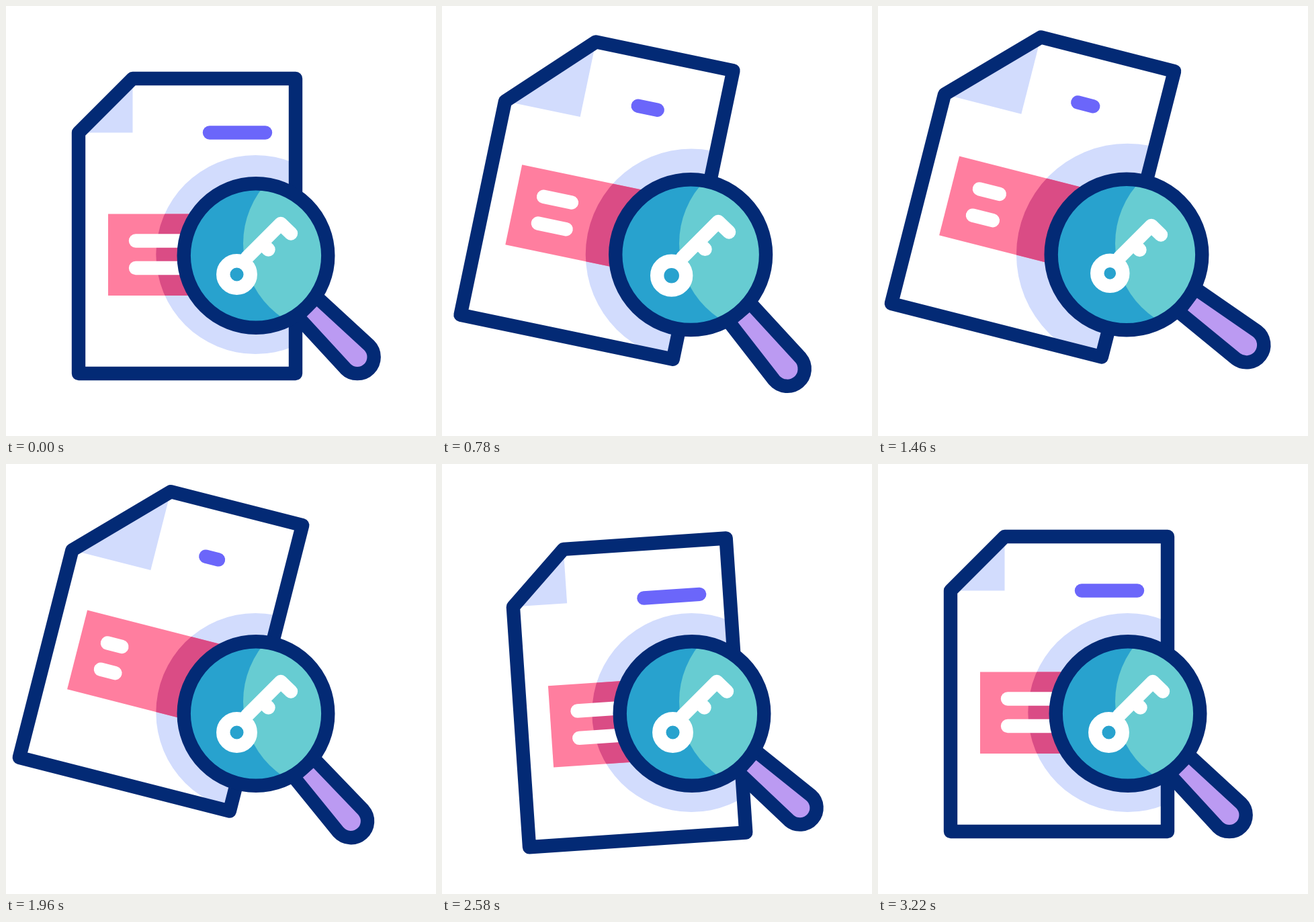
These frames come from a looping animation (640 px wide and 640 px high, 3300 ms). An HTML page with a canvas:

```html
<!DOCTYPE html>
<html lang="en">
<head>
<meta charset="utf-8">
<title>Document search</title>
<style>
  html, body { margin: 0; width: 100%; height: 100%; overflow: hidden; background: #fff; }
  canvas { display: block; width: 100vw; height: 100vh; }
</style>
</head>
<body>
<canvas id="stage" width="640" height="640"></canvas>
<script>
const LOOP = 3300;
const NAVY = '#032a75', HALO = '#d2dcfd', PINK = '#ff7e9f', ROSE = '#da4c85',
      VIOLET = '#6b66fa', LILAC = '#bb9af2', BLUE = '#28a2ce', AQUA = '#67ccd2';

// Turning points of the handle: time, angle
const SWING = [[0, 45], [270, 42], [490, 21], [870, 54.4], [1460, 37], [2010, 48.8], [2620, 41], [3220, 45]];

const ctx = document.getElementById('stage').getContext('2d');
const rad = deg => deg * Math.PI / 180;
const mix = (a, b, u) => a + (b - a) * u;

// Progress from a to b: even, eased, and eased up and down again
const linear = (t, a, b) => Math.min(1, Math.max(0, (t - a) / (b - a)));
const ease = (t, a, b) => {
  const u = linear(t, a, b);
  return u * u * (3 - 2 * u);
};
const pulse = (t, a, peak, b) => ease(t, a, peak) - ease(t, peak, b);

// The page tilts, creeps on, drops back past its rest and settles
function pagePose(t) {
  const rise = ease(t, 46, 606), creep = linear(t, 300, 2040);
  const back = ease(t, 2040, 2480), settle = 1 - ease(t, 2440, 2940);
  const drop = ease(t, 1980, 2440);
  const tilt = 10.44 * rise + 3.86 * ease(t, 300, 1500);
  const lift = 43.9 * ease(t, 180, 580) + 20.5 * creep;
  return {
    angle: mix(tilt, -4.8 * settle, back),
    x: 269.5 + mix(-39 * ease(t, 0, 533), 8.5 * settle, back),
    y: 327.5 + mix(-lift, 16 * settle, drop),
    shrink: (0.768 * rise + 0.238 * creep) * (1 - back)
  };
}

function glassPose(t) {
  const big = pulse(t, 40, 500, 912), small = pulse(t, 980, 1440, 1900);
  return {
    angle: SWING.reduce((sum, [time, angle], i) => {
      if (!i) return angle;
      const [from, before] = SWING[i - 1];
      return sum + (angle - before) * ease(t, from, time);
    }, 0),
    lens: 1 + 0.18 * big + 0.047 * small,
    halo: 1 + 0.27 * big + 0.118 * small,
    key: 1 - 0.21 * big - 0.06 * small + 0.116 * pulse(t, 500, 820, 1300)
  };
}

function trace(points, close) {
  ctx.beginPath();
  points.forEach(([x, y]) => ctx.lineTo(x, y));
  if (close) ctx.closePath();
}

function fill(color) {
  ctx.fillStyle = color;
  ctx.fill();
}

function stroke(color) {
  ctx.strokeStyle = color;
  ctx.stroke();
}

function line(color, ...points) {
  trace(points);
  stroke(color);
}

function circle(x, y, r) {
  ctx.beginPath();
  ctx.arc(x, y, r, 0, 2 * Math.PI);
}

function scoped(draw) {
  ctx.save();
  draw();
  ctx.restore();
}

function drawPage({ angle, x, y, shrink }, haloScale) {
  const fold = 108 + mix(80.5, 120.8, shrink);
  const dash = mix(83, 19, shrink), bar = mix(149, 21.5, shrink);
  const outline = [[108, fold], [fold, 108], [431, 108], [431, 547], [108, 547]];
  const place = () => {
    ctx.translate(x, y);
    ctx.rotate(rad(angle));
    ctx.translate(-269.5, -327.5);
  };
  const halo = () => circle(371.3, 370, 148 * haloScale);
  const label = color => {
    ctx.fillStyle = color;
    ctx.fillRect(152, 309.5, 225, 121.5);
  };

  scoped(() => {
    place();
    trace(outline, true);
    fill('#fff');
    trace([[108, fold], [fold, 108], [fold, fold]], true);
    fill(HALO);
  });
  scoped(() => {
    scoped(() => {
      place();
      trace(outline, true);
    });
    ctx.clip();
    halo();
    fill(HALO);
  });
  scoped(() => {
    place();
    label(PINK);
  });
  scoped(() => {
    halo();
    ctx.clip();
    place();
    label(ROSE);
  });
  scoped(() => {
    place();
    for (const row of [349.5, 390]) line('#fff', [193, row], [193 + bar, row]);
    line(VIOLET, [303, 188.5], [303 + dash, 188.5]);
    trace(outline, true);
    stroke(NAVY);
  });
}

// The key changes size but keeps its line weight
function drawKey(scale) {
  const at = (x, y) => [373.5 + x * scale, 372 + y * scale];
  line('#fff', at(-15, 2.5), at(35.5, -48), at(50.5, -33.5));
  line('#fff', at(7.5, -19), at(17, -9.5));
  circle(...at(-30, 27.5), 20.25 * scale);
  fill(BLUE);
  stroke('#fff');
}

function drawGlass({ angle, lens, key }) {
  const x = 372 - 43 * (lens - 1), y = 371.5 - 32 * (lens - 1), r = 107.3 * lens;

  scoped(() => {
    ctx.translate(x, y);
    ctx.rotate(rad(angle));
    ctx.beginPath();
    ctx.moveTo(r, -20.3 * lens);
    ctx.arc(213.5 * lens, 0, 24.7 * lens, -Math.PI / 2, Math.PI / 2);
    ctx.lineTo(r, 20.3 * lens);
    ctx.closePath();
    fill(LILAC);
    stroke(NAVY);
  });
  scoped(() => {
    circle(x, y, r);
    fill(BLUE);
    ctx.clip();
    circle(487, 353.5, 134);
    fill(AQUA);
  });
  circle(x, y, r);
  stroke(NAVY);
  drawKey(key);
}

function render(t) {
  const glass = glassPose(t);
  ctx.fillStyle = '#fff';
  ctx.fillRect(0, 0, 640, 640);
  ctx.lineWidth = 20.4;
  ctx.lineCap = ctx.lineJoin = 'round';
  drawPage(pagePose(t), glass.halo);
  drawGlass(glass);
}

const start = performance.now();
function tick() {
  render((performance.now() - start) % LOOP);
  requestAnimationFrame(tick);
}
tick();
</script>
</body>
</html>
```
